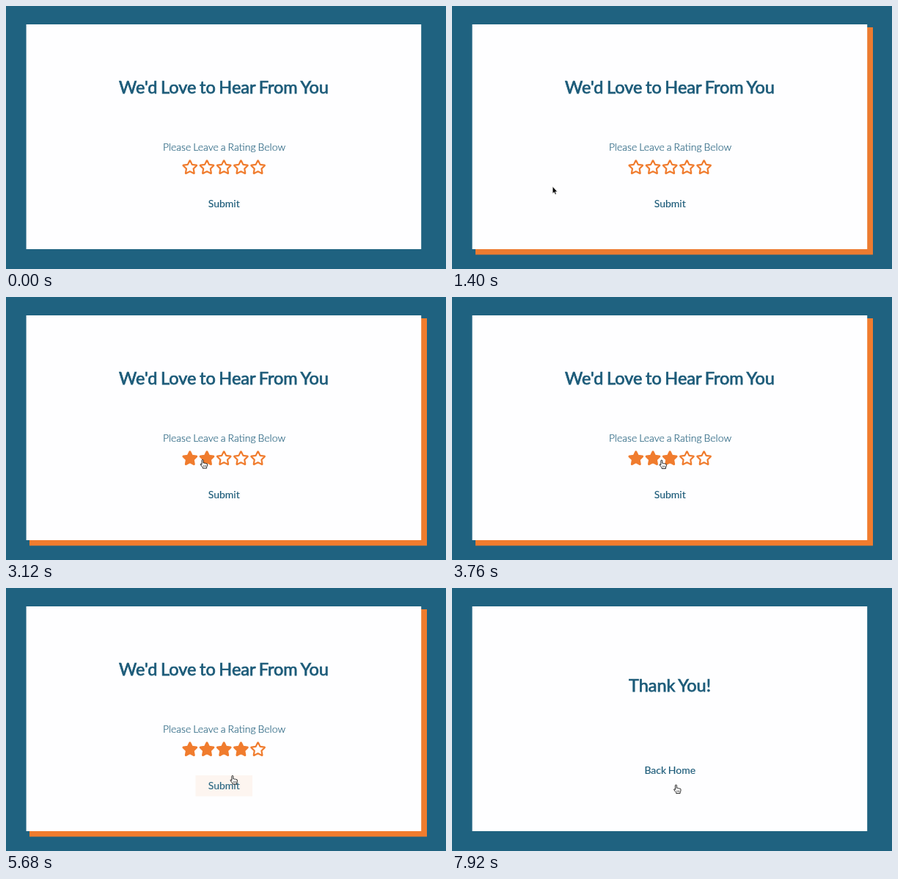
An HTML page for the animation above (8 s loop, 600 px wide and 358 px high).

```html
<!DOCTYPE html>
<html lang="en">
<head>
<meta charset="utf-8">
<title>Rating card</title>
<style>
  html, body { margin: 0; width: 100%; height: 100%; overflow: hidden; background: #1f6280; }
  svg { display: block; width: 600px; height: 358px; }
  text {
    font: 400 14px Lato, sans-serif; word-spacing: -.06em; text-anchor: middle;
    color: #1c5b79; fill: currentColor; stroke: currentColor; stroke-width: .15px;
  }
  .title { font-size: 23.5px; stroke-width: .75px; }
  .light { font-weight: 300; }
  .star { stroke: #f07c2e; stroke-width: 2.2px; stroke-linejoin: round; }
</style>
</head>
<body>
<svg viewBox="0 0 600 358">
  <rect width="600" height="358" fill="#1f6280"/>
  <rect id="shadow" x="32" y="29" width="542" height="309.5" fill="#f07c2e"/>
  <rect x="27.6" y="25" width="538.6" height="306" fill="#fefeff"/>
  <g id="form">
    <text class="title" x="297" y="119">We'd Love to Hear From You</text>
    <text class="light" x="297.5" y="197">Please Leave a Rating Below</text>
    <g id="stars"></g>
    <rect id="button" x="258.5" y="255" width="77.5" height="28.5" fill="#f07c2e"/>
    <text id="label" x="297.2" y="274">Submit</text>
  </g>
  <g id="thanks">
    <text class="title" x="297" y="141">Thank You!</text>
    <text x="297.3" y="253">Back Home</text>
  </g>
  <g id="cursor">
    <path id="arrow" d="M0 0V9.4L2.1 7.5L3.5 10.8L5 10.2L3.6 7H6.4Z" stroke="#fff" stroke-width=".5"/>
    <g id="hand" stroke="#111" stroke-width=".9" stroke-linejoin="round">
      <path fill="#fff" d="M-1 1a1 1 0 0 1 2 0V4.4Q2 3.8 2.8 4.8Q3.9 4.2 4.6 5.2Q6.6 4.6 6.6 6.6Q6.6 9 5.6 10V11.6H.2V10.4Q-1.4 8.8-3 6.2Q-2.6 5-1 6.6Z"/>
      <path stroke-width=".6" d="M1.3 7.6v2.2M2.9 7.6v2.2M4.5 7.6v2.2"/>
    </g>
  </g>
</svg>
<script>
const LOOP = 8000, SENT = 7200, PRESS = 5660;
const $ = id => document.getElementById(id);
const clamp = v => Math.max(0, Math.min(1, v));

// Pointer path: time, x, y
const path = [
  [80, 12, 279], [300, 30, 274], [880, 88.6, 258.6], [1720, 167, 238],
  [2200, 213, 227], [2640, 241, 223], [3120, 268, 221.5], [3500, 276, 222],
  [4480, 313, 222], [4720, 318, 222.5], [5060, 318, 223],
  [PRESS, 309, 255], [6200, 305, 267], [6880, 305, 267.5], [LOOP, 305.5, 268]
];

// Times at which each star fills
const fills = [2640, 3030, 3760, 4440, Infinity];

// Five-pointed star with softly rounded tips
function starPath(cx) {
  const point = (r, a) => [cx + r * Math.sin(a), 220 - r * Math.cos(a)];
  const toward = (p, q, k) => p.map((v, i) => v + (q[i] - v) * k);
  let d = '';
  for (let i = 0; i < 5; i++) {
    const a = i * Math.PI * .4, step = Math.PI / 5;
    const tip = point(10.2, a), left = point(5.1, a - step), right = point(5.1, a + step);
    d += `${i ? 'L' : 'M'}${left}L${toward(tip, left, .15)}Q${tip} ${toward(tip, right, .15)}`;
  }
  return d + 'Z';
}

$('stars').innerHTML = fills.map((_, i) =>
  `<path class="star" d="${starPath(250.8 + i * 23.2)}"/>`).join('');
const stars = [...$('stars').children];

function pointer(t) {
  const i = Math.max(1, path.findIndex(p => p[0] >= t));
  const [t0, x0, y0] = path[i - 1], [t1, x1, y1] = path[i];
  const k = clamp((t - t0) / (t1 - t0));
  return [x0 + (x1 - x0) * k, y0 + (y1 - y0) * k];
}

// CSS-like "ease": cubic-bezier(.25, .1, .25, 1)
function ease(x) {
  let lo = 0, hi = 1, s;
  for (let i = 0; i < 20; i++) {
    s = (lo + hi) / 2;
    if (.75 * s * (1 - s) + s ** 3 < x) lo = s; else hi = s;
  }
  return .3 * s * (1 - s) ** 2 + 3 * s * s * (1 - s) + s ** 3;
}

const mix = (a, b, k) => `rgb(${a.map((v, i) => Math.round(v + (b[i] - v) * k))})`;
const show = (id, on) => $(id).style.display = on ? '' : 'none';

function draw(t) {
  const [x, y] = pointer(t), sent = t >= SENT;
  const hover = ease(clamp((t - PRESS) / 250));
  const overStars = t >= fills[0] && y < 231;

  $('shadow').style.opacity = sent ? 0 : ease(clamp((t - 340) / 1300));
  show('form', !sent);
  show('thanks', sent);
  stars.forEach((s, i) => s.style.fill = t >= fills[i] ? '#f07c2e' : 'none');
  $('button').style.opacity = hover;
  $('label').style.color = mix([28, 91, 121], [255, 255, 255], hover);

  show('cursor', t >= path[0][0]);
  $('cursor').setAttribute('transform', `translate(${x} ${y})`);
  const hand = overStars || t >= PRESS;
  show('hand', hand);
  show('arrow', !hand);
}

const start = performance.now();
function tick() {
  draw((performance.now() - start) % LOOP);
  requestAnimationFrame(tick);
}
draw(0);
requestAnimationFrame(tick);
</script>
</body>
</html>
```
